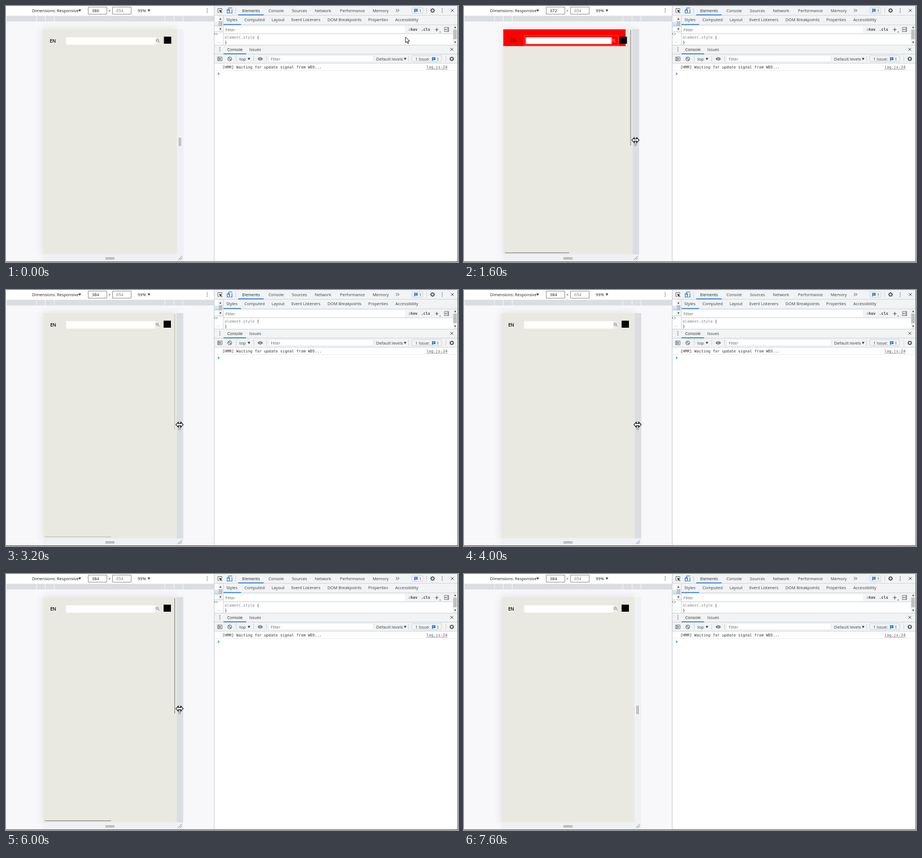
These frames come from a looping animation (800 by 455 pixels, 8 s). An HTML page with a canvas:

```html
<!DOCTYPE html>
<html lang="en">
<head>
<meta charset="utf-8">
<title>Responsive resize</title>
<style>
html, body { margin: 0; width: 100%; height: 100%; overflow: hidden; background: #fff; }
canvas { display: block; width: 800px; height: 455px; }
</style>
</head>
<body>
<canvas id="stage" width="800" height="455"></canvas>
<script>
const ctx = document.getElementById('stage').getContext('2d');
const LOOP = 8000, TICK = 200;
const SANS = '"Open Sans", "Noto Sans", sans-serif', MONO = '"DejaVu Sans Mono", monospace';
const INK = '#3c4043', BLUE = '#1a73e8', BAR = '#f1f3f4', LINE = '#cacdd1', PAGE = '#eae9e1';

// Each key is [time, value]; stepped keys hold until the next one.
const WIDTHS = [[0, 386], [1400, 380], [1600, 372], [2600, 380], [2800, 384],
  [4200, 382], [4400, 380], [4600, 378], [5600, 380], [5800, 384]];
const SCROLLBARS = [[0, 0], [1400, 1], [2200, .25], [2400, 0], [2600, 1], [3200, .4], [3400, 0],
  [4200, 1], [5000, .3], [5200, 0], [5600, 1], [6400, .3], [6600, 0]];
const POINTER = [[0, 707, 55], [200, 640, 90], [800, 325, 236]];
const LEAVING = [[6400, 335, 226], [6600, 387, 206], [7400, 437, 178]];

const held = (keys, t) => keys.filter(k => k[0] <= t).pop()[1];
function along(keys, t) {
  const i = Math.max(1, keys.findIndex(k => k[0] >= t));
  const a = keys[i - 1], b = keys[i], p = (t - a[0]) / (b[0] - a[0]);
  return [a[1] + (b[1] - a[1]) * p, a[2] + (b[2] - a[2]) * p];
}

function rect(x, y, w, h, color) {
  ctx.fillStyle = color;
  ctx.fillRect(x, y, w, h);
}
function box(x, y, w, h, stroke, fill, radius = 0) {
  ctx.beginPath();
  ctx.roundRect(x, y, w, h, radius);
  if (fill) { ctx.fillStyle = fill; ctx.fill(); }
  ctx.strokeStyle = stroke;
  ctx.lineWidth = .8;
  ctx.stroke();
}
function text(s, x, y, color = INK, size = 7.3, family = SANS, weight = 400) {
  ctx.font = `${weight} ${size}px ${family}`;
  ctx.fillStyle = color;
  ctx.fillText(s, x, y);
}
function path(d, x, y, stroke, fill, width = .9) {
  ctx.save();
  ctx.translate(x, y);
  const p = new Path2D(d);
  if (fill) { ctx.fillStyle = fill; ctx.fill(p); }
  if (stroke) { ctx.strokeStyle = stroke; ctx.lineWidth = width; ctx.stroke(p); }
  ctx.restore();
}
const line = (d, x, y, color = '#5f6368', width = .9) => path(d, x, y, color, null, width);
const triangle = (x, y, s = 2.3, up = 1) =>
  path(`M${-s} ${-s * .8 * up}H${s}L0 ${s * up}Z`, x, y, null, INK);
const close = (x, y) => line('M-2.5 -2.5L2.5 2.5M2.5 -2.5L-2.5 2.5', x, y, INK);
const dots = (x, y) => [-3, 0, 3].forEach(d => rect(x - .7, y + d - .7, 1.4, 1.4, '#5f6368'));
function gear(x, y) {
  for (let i = 0; i < 8; i++) {
    const a = i * Math.PI / 4, c = Math.cos(a), s = Math.sin(a);
    line(`M${2.5 * c} ${2.5 * s}L${4 * c} ${4 * s}`, x, y, INK, 1.4);
  }
  line('M2.5 0A2.5 2.5 0 1 1 -2.5 0A2.5 2.5 0 1 1 2.5 0', x, y, INK, 1.2);
}
function bubble(x, y) {
  path('M-3 -3H3V2H-1L-3 4Z', x, y, null, BLUE);
  line('M-1.7 -1.5H1.7M-1.7 .3H1', x, y, '#fff', .6);
}

function drawDevtools(t) {
  rect(368, 0, 432, 455, '#fff');
  rect(368, 0, 432, 16, BAR);
  rect(384, 17, 416, 16, BAR);
  rect(368, 69, 432, 33, BAR);
  [[368, 16], [384, 33], [384, 49], [368, 69], [368, 85], [368, 101.5]]
    .forEach(([x, y]) => rect(x, y, 800 - x, .8, LINE));
  rect(368, 114, 432, .8, '#ececec');
  rect(368, 0, .8, 455, '#bfc2c6');
  rect(384, 17, .8, 52, LINE);

  line('M1 -3.5H-3.5V3.5H-1.5M-3.5 -3.5M3.5 -1V-3.5H0', 378.5, 8);
  path('M-1 -1L4.5 1L2 2L4.5 4.5L3.5 5.2L1.5 3L.4 5Z', 378.5, 7.5, null, INK);
  line('M-2 1V-4.5H4.5M-4.5 -1.5H-.5V4.5H-4.5ZM1 4.5H4V-2', 396, 8, BLUE, 1.1);
  rect(406, 3, .8, 10, LINE);
  [['Elements', 418], ['Console', 464.5], ['Sources', 506], ['Network', 546.5],
    ['Performance', 591], ['Memory', 649]].forEach(([s, x], i) => text(s, x, 10.6, i ? INK : '#202124'));
  rect(411, 15, 45, 1.5, BLUE);
  line('M-2.5 -2.5L0 0L-2.5 2.5M.7 -2.5L3.2 0L.7 2.5', 692.5, 8, INK);
  box(718, 3, 20, 10, LINE, null, 2);
  bubble(725.5, 8);
  text('1', 731, 10.6);
  rect(744, 3, .8, 10, LINE);
  gear(755, 8);
  dots(772, 8);
  close(790, 8);

  [['Styles', 390], ['Computed', 422], ['Layout', 470], ['Event Listeners', 505],
    ['DOM Breakpoints', 569], ['Properties', 641], ['Accessibility', 689]].forEach(([s, x]) => text(s, x, 27.2));
  rect(385, 32.2, 31, 1.4, BLUE);

  rect(385, 34, 406, 15, BAR);
  rect(386, 36, 320, 12, '#fff');
  text('Filter', 388.5, 44.5, '#626569');
  text(':hov', 712, 44, INK, 6.8, MONO, 700);
  text('.cls', 734.5, 44, INK, 6.8, MONO, 700);
  line('M-3 0H3M0 -3V3', 762.5, 42, INK);
  path('M0 0H2V-2Z', 767, 47, null, INK);
  box(776, 38, 7.5, 7.5, '#5f6368');
  line('M2.5 -3.5V3.5M1 0H-2M-.5 -1.5L-2 0L-.5 1.5', 779.5, 41.8);
  text('element.style', 387, 57.5, '#808080', 6.8, MONO);
  text('{', 444, 57.5, '#222', 6.8, MONO);
  text('}', 387, 67.3, '#222', 6.8, MONO);
  rect(791, 34, 7.5, 35, '#f1f1f1');
  rect(791.5, 42, 6.5, 17, '#c1c1c1');
  triangle(795, 38, 1.7, -1);
  triangle(795, 64.5, 1.7);

  // Collapsed DOM tree beside the styles pane
  rect(369, 28, 7, 9, t >= 1400 ? '#d3e5fb' : '#eceef0');
  text('..', 370, 35, INK, 6, MONO);
  rect(376, 17, 7.5, 32, '#f1f1f1');
  rect(376.5, 27, 6.5, 9, '#c1c1c1');
  triangle(379.5, 23, 1.7, -1);
  triangle(379.5, 41, 1.7);
  rect(369, 45, 15, .8, LINE);
  line('M-1 -2L-2.5 0L-1 2M1 -2L2.5 0L1 2', 371.5, 49.5, INK, .8);
  text('...', 373.5, 65, '#5f6368', 6);

  dots(378.5, 77);
  text('Console', 391.5, 79.7, '#202124');
  text('Issues', 430.5, 79.7);
  rect(385, 84.3, 40, 1.5, BLUE);
  close(789, 77);
  line('M-3.8 -3.2H3.8V3.2H-3.8ZM-2 -3V3', 378.5, 94);
  path('M0 -2L2.4 0L0 2Z', 378.2, 94, null, INK);
  line('M3.3 0A3.3 3.3 0 1 1 -3.3 0A3.3 3.3 0 1 1 3.3 0M-2.3 -2.3L2.3 2.3', 396, 94, '#5f6368', 1.1);
  [407, 438, 461, 712, 778].forEach(x => rect(x, 88, .8, 11, LINE));
  text('top', 413, 96.6);
  triangle(430, 94);
  path('M-4.7 0Q0 -6 4.7 0Q0 6 -4.7 0Z', 450, 94, null, '#5f6368');
  line('M1.6 0A1.6 1.6 0 1 1 -1.6 0A1.6 1.6 0 1 1 1.6 0', 450, 94, '#fff', .8);
  box(465, 88, 185, 11, '#e4e6e8', '#fff');
  text('Filter', 468.5, 96.6, '#626569');
  text('Default levels', 655, 96.6, INK, 7.6);
  triangle(706.5, 94);
  box(718, 88, 53, 11, LINE, null, 2);
  text('1 Issue:', 724.5, 96.6);
  bubble(757, 94);
  text('1', 762.5, 96.6);
  gear(789, 94);

  text('[HMR] Waiting for update signal from WDS...', 383, 110.8, '#333', 6.8, MONO);
  text('log.js:24', 744, 110.8, '#555', 6.9, MONO);
  rect(744, 112, 37.5, .6, '#777');
  line('M-1 -2L1.3 0L-1 2', 376, 120.5, '#367cf1', 1.1);
}

function drawToolbar(width) {
  rect(0, 0, 368, 17, '#fff');
  text('Dimensions: Responsive', 46, 10.7, '#202124');
  triangle(130.5, 8);
  box(145.5, 2, 33, 12.5, '#777', '#fff');
  text(width, 152, 10.8, '#202124', 7.5);
  text('×', 181, 10.7);
  box(188.5, 2, 33, 12.5, '#777', '#fff');
  text('654', 195, 10.8, '#777', 7.5);
  text('99%', 233, 10.7, '#202124', 7.5);
  triangle(253, 8);
  dots(356, 8);
  rect(1, 17.5, 367, 10, '#dadde2');
  [54, 69.5, 85.5, 281, 297.5, 313].forEach(x => rect(x - .5, 17.5, 1, 10, '#f7f7f9'));
}

function drawPage(width, bars, hovered) {
  const half = width * .3077, left = 184 - half, right = 184 + half;
  const narrow = width < 383, shrink = 386 - width;

  ctx.save();
  ctx.shadowColor = 'rgba(60,60,80,.12)';
  ctx.shadowBlur = 14;
  rect(left, 41, right - left, 400.5, PAGE);
  ctx.restore();
  rect(right, 41, 11.5, 401, hovered ? '#dadde2' : '#f0f1f5');
  rect(left, 441.5, right - left + 11.5, 13, '#f0f1f5');
  [-1.2, 1.2].forEach(d => {
    rect(right + 5 + d - .4, 234, .9, 15, '#777');
    rect(176, 448.5 + d - .4, 16, .9, '#777');
  });
  line('M-3.5 3L3.5 -4M0 3L3.5 -.5', right + 5.5, 448.5, '#777', .9);

  const inputLeft = narrow ? left + 39.8 : 106.5;
  const inputRight = 265 - shrink * (narrow ? .27 : .5);
  const icon = 269 - shrink * .28;
  if (narrow) {
    rect(left, 41.5, 292 - (378 - width) - left, 29.7, '#f00');
    ctx.setLineDash([1, .6]);
    box(inputLeft - 2.5, 52.5, inputRight - inputLeft + 14.5, 17.5, '#ff9c9c');
    ctx.setLineDash([]);
  }
  rect(inputLeft, 55.5, inputRight - inputLeft, narrow ? 12 : 13, '#fff');
  if (!narrow) rect(inputRight, 55.5, 8, 13, '#efeee9');
  line('M1.2 -.8A2 2 0 1 1 -2.8 -.8A2 2 0 1 1 1.2 -.8M.7 .7L3.2 3.2', icon, 61.7,
    narrow ? '#f4a0a0' : '#777', 1);
  text('EN', left + 12.3, narrow ? 64 : 64.7, narrow ? '#300' : '#000', 8, SANS, 600);
  rect(279.5 - shrink * .29, 54.5, 13, 12.5, '#080404');

  if (bars) {
    ctx.globalAlpha = bars;
    rect(right - 4.2, 43, 1.2, 205, '#8b8983');
    rect(left + 3, 438, 186 - left - 3, 1.2, '#8b8983');
    ctx.globalAlpha = 1;
  }
  return right;
}

const drawArrow = (x, y) => path('M0 0V10.2L2.4 8L4.1 12L5.8 11.2L4.1 7.4H7.2Z', x, y, '#111', '#fff', .9);
const drawResizer = (x, y) =>
  path('M-6.5 0L-2.3 -4.5V-1.8H2.3V-4.5L6.5 0L2.3 4.5V1.8H-2.3V4.5Z', x, y, '#111', '#fff', 1.1);

function draw(t) {
  const width = held(WIDTHS, t);
  const hovered = t >= 1000 && t < 6400;
  rect(0, 0, 368, 455, '#f8f8fa');
  const right = drawPage(width, held(SCROLLBARS, t), hovered);
  drawToolbar(width);
  drawDevtools(t);
  rect(0, 454, 800, 1, '#55565a');
  rect(799, 0, 1, 455, '#77747a');
  if (hovered) drawResizer(right + 5, t < 1400 ? 237.5 : t < 2600 ? 238.3 : 239.3);
  else if (t < 1000) drawArrow(...along(POINTER, t));
  else if (t < 7600) drawArrow(...along(LEAVING, t));
}

function frame(now) {
  draw(Math.floor(now % LOOP / TICK) * TICK);
  requestAnimationFrame(frame);
}
requestAnimationFrame(frame);
</script>
</body>
</html>
```
